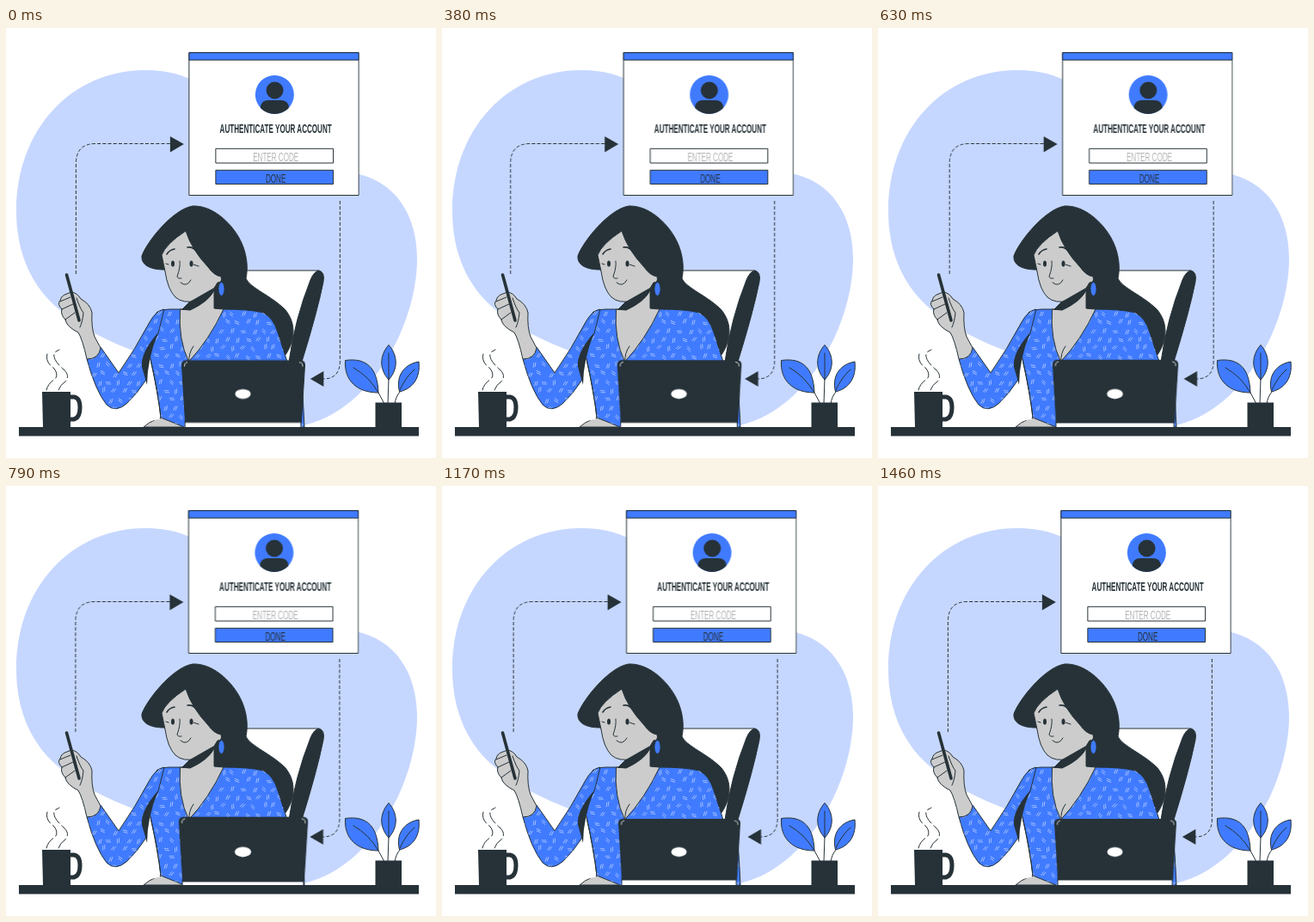
Animation of 500 by 500 pixels, one loop 1500 ms. Source, as an HTML page:

```html
<!DOCTYPE html>
<html lang="en">
<head>
<meta charset="utf-8">
<title>Authenticate your account</title>
<style>
  html, body { margin: 0; width: 100%; height: 100%; overflow: hidden; background: #fff; }
  svg { display: block; width: 100vw; height: 100vh; }
  .ink { fill: #263238; }
  .blue { fill: #407bff; }
  .skin { fill: #ccc; }
  .paper { fill: #fff; }
  .edge { stroke: #263238; stroke-width: 1; stroke-linejoin: round; }
  .line { fill: none; stroke: #263238; stroke-width: 1; stroke-linecap: round; stroke-linejoin: round; }
  .dash { fill: none; stroke: #263238; stroke-width: 1; stroke-dasharray: 4 2.2; }
  text { font-family: "Liberation Sans", Arial, sans-serif; font-size: 14.2px; text-anchor: middle; }
  #laptop { transform-origin: 276px 425.5px; }
</style>
</head>
<body>
<svg viewBox="0 0 500 500">
  <defs>
    <path id="torso" d="M176 330 Q182 327 190 327 L203 327 L253 327 Q284 327 299 331 Q311 337 316 354 L327 388 L342 400 Q346 430 347 464 L207 464 L180 453 Q177 425 168 385 L160 355Z"/>
    <path id="sleeve" d="M184 327 Q174 329 167 342 Q150 374 131 401 L110 371 L94 385 Q104 422 117 438 Q127 448 140 437 Q152 426 163 409 Q157 385 177 355Z"/>
    <clipPath id="cloth"><use href="#torso"/><use href="#sleeve"/></clipPath>
    <clipPath id="badge"><circle cx="312.5" cy="77.5" r="22.5"/></clipPath>
  </defs>

  <path fill="#c6d7ff" d="M12 213 C12 118 76 49 162 49 C212 49 243 72 270 105 C306 150 350 161 405 169 C452 177 478 217 478 268 C478 345 425 442 350 461 C285 474 230 420 190 392 C150 374 106 364 64 329 C30 302 12 262 12 213Z"/>

  <g id="chair">
    <path class="paper edge" d="M270 282 H364 L334 388 H290Z"/>
    <path class="ink edge" d="M364 282 Q371 284 369 295 Q362 330 344 388 H329 Q336 338 354 293 Q358 283 364 282Z"/>
  </g>

  <g id="woman">
    <path class="ink edge" d="M158 265 C163 250 193 211 217 207 C240 206 261 226 271 244 C280 260 282 278 279 291 C283 302 310 312 325 328 C338 344 336 364 325 380 L300 345 L240 328 L204 328 L214 318 L184 281 C170 281 157 277 158 265Z"/>
    <path class="skin edge" d="M209 236 Q186 251 181 264 L185 283 Q188 304 197 313 Q206 321 222 317 Q238 312 246 296 Q252 296 250 289 Q242 288 235 278 Q216 258 209 236Z"/>
    <path class="line" d="M187 263 Q190 258 196 257 M211 255 Q217 254 221 259" style="stroke-width:1.6"/>
    <path class="line" d="M202 271 Q203 278 199 289 Q200 292 204 291 M203 296 Q210 302 215 293 M189 275 l-3 -1 M218 275 l6 2"/>
    <ellipse class="ink" cx="194" cy="274" rx="2" ry="3.5"/>
    <ellipse class="ink" cx="215.5" cy="274" rx="2" ry="3.5"/>

    <path class="skin edge" d="M160 464 Q172 453 190 452 L210 456 V464Z"/>
    <use href="#torso" class="blue edge"/>
    <path class="paper" d="M150 428 L163 409 Q168 420 179 455 L150 460Z"/>
    <use href="#sleeve" class="blue edge"/>
    <g id="flecks" clip-path="url(#cloth)" fill="none" stroke="#b9ceff" stroke-width=".75"></g>
    <path class="skin edge" d="M202.500 327 Q200 362 212.500 388 Q236 363 253 327 L242 326 L242 305 Q236 318 214 328Z"/>
    <path class="ink" d="M214 318 L204 328 L214 328 Q232 321 242 302Z"/>
    <path class="line" d="M213 388 Q212 378 218 370"/>
    <path class="ink" d="M177 354 Q156 378 158 394 L164 415 Q164 386 177 354Z"/>
    <path class="line" d="M168 385 Q177 425 180 453"/>
    <ellipse class="blue edge" cx="250.5" cy="303.5" rx="3.6" ry="8"/>

    <path class="skin edge" d="M94 385 Q89 362 84 354 Q70 347 69 339 Q63 333 65 327 Q59 321 63 317 Q64 311 71 309 L76 307 Q83 308 87 315 Q98 321 100 331 Q99 348 103 359 L110 372 Q108 385 94 385Z"/>
    <path class="line" d="M63 318 L75 313 M65 327 L78 321 M69 339 L80 331 M82 314 Q86 326 90 331 Q89 342 86 348"/>
    <path class="line" d="M70.500 287 L85 340" style="stroke-width:3.6"/>
  </g>

  <g id="panel">
    <path class="dash" d="M81.500 286 V157 Q82 134.500 104 134.500 H191"/>
    <path class="ink" d="M191 126 L207 135 L191 144.500Z"/>
    <path class="dash" d="M388.500 201 V388 Q388 408 369 408"/>
    <path class="ink" d="M354 408 L369.500 399 V417Z"/>
    <rect class="paper edge" x="213" y="28.700" width="197.300" height="165.800"/>
    <rect class="blue edge" x="213" y="28.700" width="197.300" height="8.500"/>
    <circle class="blue" cx="312.500" cy="77.500" r="22.500"/>
    <g class="ink" clip-path="url(#badge)">
      <circle cx="312.700" cy="72.500" r="10"/>
      <path d="M296 102 V92 Q297 84 305 84 H320 Q328 84 329 92 V102Z"/>
    </g>
    <rect class="paper edge" x="244" y="140.300" width="136.700" height="16.700"/>
    <rect class="blue edge" x="244" y="165.300" width="136.700" height="16.200"/>
    <g id="labels"></g>
  </g>

  <g id="laptop">
    <rect class="paper edge" x="209" y="456" width="133" height="9"/>
    <path class="ink edge" d="M210.500 387.300 H341.500 Q347 387.500 346.500 393 L342.500 458 H209.500 L205.500 393 Q205 387.500 210.500 387.300Z"/>
    <path fill="none" stroke="#fff" stroke-width=".8" d="M208.500 394 Q208 389.500 212 389.200 M340 389.200 Q344.500 389.500 344 394"/>
    <ellipse class="paper" cx="275.500" cy="425.500" rx="9" ry="5.500"/>
  </g>

  <g id="mug">
    <path class="line" stroke-dasharray="14 4" d="M47 421 Q49 413 56 409 Q62 404 56 396 Q45 388 48 379 M61 421 Q63 415 69 411 Q75 404 67 397 Q52 384 57 377 L62 374"/>
    <path class="ink" d="M42 423 H75 V464 H43Z"/>
    <path fill="none" stroke="#263238" stroke-width="5" d="M74 429 H79 Q86 430 86 441 Q86 453 79 455 H74"/>
  </g>

  <g id="plant">
    <path class="line" d="M433 424 L440 437 M445 408 L444 437 M458 423 Q453 429 452 437"/>
    <path class="blue edge" d="M394.500 386.500 C420 383 432 396 433 424 C408 424 393 410 394.500 386.500Z"/>
    <path class="blue edge" d="M445 368.500 C456 381 456 397 445 409 C434 397 434 381 445 368.500Z"/>
    <path class="blue edge" d="M480 388 C463 391 453 404 457.500 423 C474 419 482 406 480 388Z"/>
    <path class="line" d="M404 395 Q422 405 433 424 M445 378 V409 M475 397 Q464 407 458 421"/>
    <rect class="ink" x="429.500" y="435.500" width="30.500" height="29"/>
  </g>

  <rect class="ink" x="15" y="464" width="465" height="10.500"/>
</svg>
<script>
const $ = id => document.getElementById(id);
const svg = (tag, attrs, parent) => {
  const el = document.createElementNS('http://www.w3.org/2000/svg', tag);
  for (const k in attrs) el.setAttribute(k, attrs[k]);
  return parent.appendChild(el);
};

// Condensed lettering, one proportion for all labels
const label = (str, y, fill, weight) => {
  const el = svg('text', { transform: `translate(313.800 ${y}) scale(.57 1)`, fill, 'font-weight': weight }, $('labels'));
  el.textContent = str;
};
label('AUTHENTICATE YOUR ACCOUNT', 122, '#263238', 700);
label('ENTER CODE', 155, '#b4b4b4', 400);
label('DONE', 179.5, '#263238', 400);

// Paired strokes scattered over the blouse
let seed = 11;
const rnd = () => (seed = seed * 16807 % 2147483647) / 2147483647;
for (let y = 332, row = 0; y < 464; y += 10, row++) {
  for (let x = 96 + row % 2 * 6; x < 346; x += 12) {
    const turn = (rnd() < .5 ? 0 : 90) + rnd() * 60 - 10;
    const cx = x + rnd() * 4 - 2, cy = y + rnd() * 4 - 2;
    svg('path', { d: 'M-3.2 -1 H2.2 M-2.2 1 H3.2', transform: `translate(${cx} ${cy}) rotate(${turn})` }, $('flecks'));
  }
}

// Tracks hold [progress, value] pairs joined by straight lines
const shake = [[0, 0], [.1, -1], [.2, 2], [.3, -4], [.4, 4], [.5, -4], [.6, 4], [.7, -4], [.8, 2], [.9, -1], [1, 0]];
const beat = [[0, 1], [.1, 1.1], [.3, 1], [.4, 1], [.5, 1.1], [.6, 1], [1, 1]];
const sample = (track, p) => {
  const i = track.findIndex(k => k[0] >= p);
  const [a, u] = track[Math.max(i - 1, 0)], [b, v] = track[Math.max(i, 1)];
  return u + (v - u) * (p - a) / (b - a);
};

// 24 held poses per second, each sampled at the middle of its slot
const LOOP = 1500, POSES = 36;
const play = (id, track, css) => {
  const frames = [];
  for (let n = 0; n <= POSES; n++) {
    const start = Math.round(n * LOOP / POSES / 10) * 10;
    const value = sample(track, (n % POSES + .5) / POSES);
    frames.push({ offset: start / LOOP, transform: css(value), easing: 'steps(1, end)' });
  }
  $(id).animate(frames, { duration: LOOP, iterations: Infinity });
};
play('panel', shake, v => `translateX(${v}px)`);
play('laptop', beat, v => `scale(${v})`);
</script>
</body>
</html>
```
